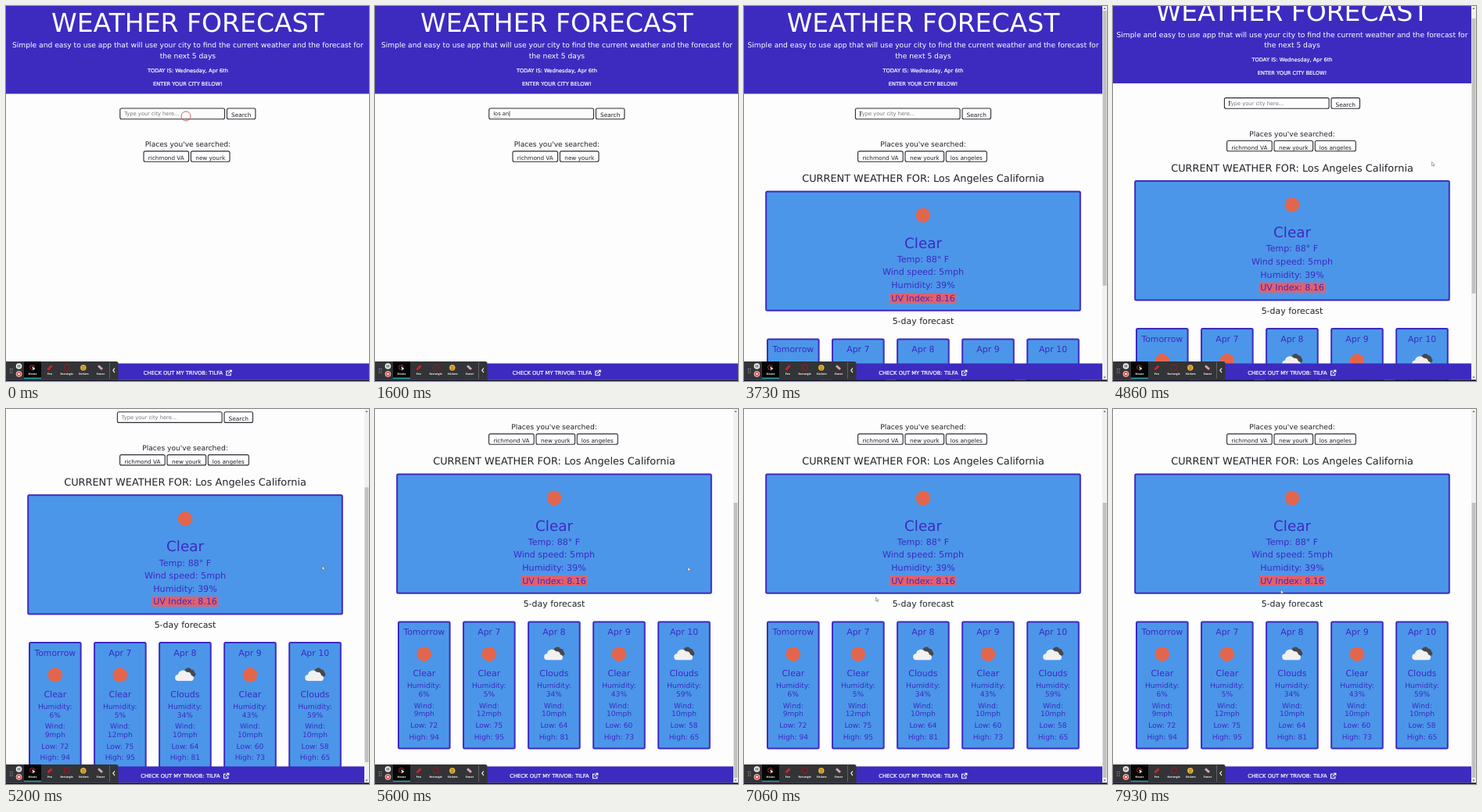
Animation of 464x480 px, one loop 8000 ms. Source, as an HTML page:

```html
<!DOCTYPE html>
<html lang="en">
<head>
<meta charset="utf-8">
<title>Weather forecast</title>
<style>
  html, body { margin: 0; width: 100%; height: 100%; overflow: hidden; background: #fdfdfd; }
  svg { display: block; width: 100vw; height: 100vh; }
  text { font-family: "DejaVu Sans", Verdana, sans-serif; text-rendering: geometricPrecision; white-space: pre; }
  .mid { text-anchor: middle; }
  .brand { fill: #3d2bc0; }
  .dark { fill: #212329; }
  .light { fill: #fff; }
  .strong { stroke: #fff; stroke-width: .2; }
  .hint { fill: #74777c; }
  .box { fill: #fdfdfd; stroke: #2b2d33; stroke-width: 1.1; }
  .card { fill: #4c96e9; stroke: #3d2bc0; stroke-width: 2; }
  .sun { fill: #e2664d; }
  .tool { font: 700 3.3px "Open Sans", sans-serif; fill: #fff; }
</style>
</head>
<body>
<svg viewBox="0 0 464 480" preserveAspectRatio="none">
  <defs>
    <g id="sun"><circle class="sun" r="9.3"/></g>
    <g id="cloud">
      <path fill="#48484a" d="M0 -3a4.5 4.5 0 0 1 8 -4a4 4 0 0 1 4 3.500a3.300 3.300 0 0 1 0 5.500h-9z"/>
      <path fill="#f1f1f1" d="M-8.500 7.500a4 4 0 0 1 -.5 -8a6.500 6.500 0 0 1 11.500 -3a5 5 0 0 1 5.500 4a3.700 3.700 0 0 1 1 7z"/>
    </g>
  </defs>
  <rect width="464" height="480" fill="#fdfdfd"/>
  <g id="page">
    <rect class="brand" x="-10" y="-2" width="490" height="114.400"/>
    <g id="search">
      <rect class="box" x="142.400" y="131" width="133.700" height="13.700" rx="2"/>
      <text id="entry" x="147.800" y="140.400" font-size="6.700"></text>
      <path id="squiggle" d="M148 142.300h9.300" stroke="#d33" stroke-width=".7" stroke-dasharray="1 .6"/>
      <rect id="caret" y="134.500" width=".7" height="7" fill="#111"/>
    </g>
    <g id="history"></g>
    <g id="results"></g>
  </g>
  <rect class="brand" y="457.500" width="464" height="21"/>
  <g id="footer">
    <text class="light strong" x="172.300" y="472" font-size="6.750">CHECK OUT MY TRIVOB: TILFA</text>
    <path d="M281.500 467.300h-3v5.400h5.300v-2.700M280.700 470.400l4-4M282 466.300h2.800v2.800" fill="none" stroke="#fff" stroke-width="1.100"/>
  </g>
  <g id="scrollbar">
    <rect x="458" width="6" height="478.500" fill="#f1f1f1"/>
    <path d="M459.500 4l1.500-2 1.500 2zM459.500 474.500l1.500 2 1.500-2z" fill="#606060"/>
    <rect id="thumb" x="458.600" y="6" width="4.800" height="352" fill="#c1c1c1"/>
  </g>
  <rect y="478.500" width="464" height="1.500" fill="#0b0a24"/>
  <g id="tools">
    <path d="M0 455h141a2.500 2.500 0 0 1 2.500 2.500v21H0z" fill="#333437"/>
    <rect x="23" y="455" width="22" height="22" fill="#050505"/>
    <rect x="23" y="475.700" width="22" height="1.300" fill="#22b8b0"/>
    <path d="M5.500 464v6M8 464v6" stroke="#aaa" stroke-width="1.100" stroke-dasharray="1.100 1.400"/>
    <circle cx="16.500" cy="461" r="3.800" fill="#eee"/>
    <path d="M15.400 459.300v3.400M17.600 459.300v3.400" stroke="#333" stroke-width="1"/>
    <circle cx="16.500" cy="471" r="3.500" fill="#e8443c" stroke="#eee" stroke-width=".8"/>
    <rect x="15.300" y="469.800" width="2.400" height="2.400" fill="#fff"/>
    <circle cx="33.500" cy="462.500" r="3" fill="none" stroke="#d6343f" stroke-width=".8"/>
    <path d="M33.500 461l4 3.700-2 .2-1 1.800z" fill="#fff"/>
    <path d="M53.500 465.500l5-5" stroke="#d6202c" stroke-width="2.600"/>
    <rect x="74.500" y="459.500" width="6.500" height="6.500" rx="1" fill="none" stroke="#a31621" stroke-width="1"/>
    <circle cx="98.800" cy="463" r="3.700" fill="#efb83c"/>
    <path d="M96.800 462h4M97 464.200q1.800 1.600 3.600 0" fill="none" stroke="#60420e" stroke-width=".8"/>
    <path d="M118 460.500l5 4.500" stroke="#d9a6b0" stroke-width="3"/>
    <path d="M132.500 456v21" stroke="#77787a" stroke-width=".7"/>
    <path d="M139 463.500l-2.200 2.800 2.200 2.800" fill="none" stroke="#fff" stroke-width="1.100"/>
  </g>
  <circle id="ring" cx="230" cy="141" r="6" fill="none" stroke="#c8505c" stroke-width=".9"/>
  <path id="cursor" d="M0 0v5l1.200-1 .9 1.800 .9-.4-.9-1.700h1.600z" fill="#fff" stroke="#555" stroke-width=".5"/>
</svg>
<script>
const LOOP = 8000, CENTER = 229, SUBMIT = 3130, LOADED = 3460;
const $ = id => document.getElementById(id);

function add(parent, tag, attrs, content = '') {
  const el = document.createElementNS('http://www.w3.org/2000/svg', tag);
  for (const name in attrs) el.setAttribute(name, attrs[name]);
  el.textContent = content;
  return parent.appendChild(el);
}
const label = (parent, content, y, size, color = 'dark', x = CENTER) =>
  add(parent, 'text', { x, y, 'font-size': size, class: 'mid ' + color }, content);
const icon = (parent, name, x, y) =>
  add(parent, 'use', { href: '#' + name, transform: `translate(${x} ${y})` });

function button(parent, content, x, y, width, height, size = 7.25) {
  const group = add(parent, 'g', {});
  add(group, 'rect', { class: 'box', x, y, width, height, rx: 2 });
  label(group, content, y + 11.4, size, 'dark', x + width / 2);
  return group;
}

// Header and search row
const page = $('page');
label(page, 'WEATHER FORECAST', 32.8, 33.05, 'light');
label(page, 'Simple and easy to use app that will use your city to find the current weather and the forecast for', 53, 9.16, 'light');
label(page, 'the next 5 days', 66.8, 9.16, 'light');
label(page, 'TODAY IS: Wednesday, Apr 6th', 84.6, 6.7, 'light strong');
label(page, 'ENTER YOUR CITY BELOW!', 101.6, 6.68, 'light strong');
label(page, "Places you've searched:", 180, 9.1);
button($('search'), 'Search', 279, 131, 36.5, 13.7, 7.4);

const history = $('history');
button(history, 'richmond VA', 145.6, 185.9, 57.6, 13.3);
button(history, 'new yourk', 206, 185.9, 49.6, 13.3);
const newPlace = button(history, 'los angeles', 258.3, 185.9, 52, 13.3);

// Current weather
const results = $('results');
label(results, 'CURRENT WEATHER FOR: Los Angeles California', 225, 12.86);
add(results, 'rect', { class: 'card', x: 28.2, y: 237.5, width: 401.6, height: 152.3, rx: 1.5 });
icon(results, 'sun', CENTER, 267.8);
label(results, 'Clear', 309.7, 18.3, 'brand');
add(results, 'rect', { x: 186.7, y: 367.4, width: 84.6, height: 12.8, fill: '#e2606c' });
['Temp: 88° F', 'Wind speed: 5mph', 'Humidity: 39%', 'UV Index: 8.16']
  .forEach((line, i) => label(results, line, 327.8 + i * 16.6, 11.1, 'brand'));
label(results, '5-day forecast', 407, 10.95);

// Five-day forecast: day, sky, humidity, wind, low, high
[
  ['Tomorrow', 'Clear', 6, 9, 72, 94],
  ['Apr 7', 'Clear', 5, 12, 75, 95],
  ['Apr 8', 'Clouds', 34, 10, 64, 81],
  ['Apr 9', 'Clear', 43, 10, 60, 73],
  ['Apr 10', 'Clouds', 59, 10, 58, 65],
].forEach(([day, sky, humidity, wind, low, high], i) => {
  const x = 62.8 + i * 83.05;
  add(results, 'rect', { class: 'card', x: x - 32.8, y: 426.4, width: 65.6, height: 162, rx: 1.5 });
  label(results, day, 443.4, 10.9, 'brand', x);
  icon(results, sky === 'Clear' ? 'sun' : 'cloud', x, 467.7);
  label(results, sky, 496.4, 11, 'brand', x);
  [
    ['Humidity:', 511.2], [humidity + '%', 522], ['Wind:', 536.6], [wind + 'mph', 547.4],
    ['Low: ' + low, 562], ['High: ' + high, 576.6],
  ].forEach(([line, y]) => label(results, line, y, 9.1, 'brand', x));
});

['Mouse', 'Pen', 'Rectangle', 'Stickers', 'Eraser'].forEach((name, i) =>
  add($('tools'), 'text', { class: 'mid tool', x: 34 + i * 21.75, y: 472 }, name));

// Motion: each key is [time, value]
const KEYSTROKES = [800, 1060, 1200, 1330, 1460, 1600, 2000, 2060, 2130, 2200, 2260];
const SCROLL = [[4790, 0], [4860, 13], [5000, 72], [5130, 112], [5260, 140], [5400, 154],
  [6500, 154], [6610, 118], [6700, 118], [6840, 154]];
const CURSOR_X = [[4400, 430], [4700, 408], [5000, 407], [5500, 400], [6000, 400], [6600, 158.5], [6900, 158.5], [7800, 214.5]];
const CURSOR_Y = [[4400, 215], [4700, 199], [5000, 200], [5500, 202.5], [6000, 202.5], [6600, 243], [6900, 243], [7800, 231.5]];

function at(keys, t) {
  const next = keys.findIndex(key => key[0] > t);
  if (next === 0) return keys[0][1];
  if (next < 0) return keys[keys.length - 1][1];
  const [t0, a] = keys[next - 1], [t1, b] = keys[next];
  return a + (b - a) * (t - t0) / (t1 - t0);
}
const show = (el, on) => el.setAttribute('visibility', on ? 'inherit' : 'hidden');
const move = (el, x, y) => el.setAttribute('transform', `translate(${x} ${y})`);

function draw(t) {
  const submitted = t >= SUBMIT, loaded = t >= LOADED;
  const typed = submitted ? '' : 'los angeles'.slice(0, KEYSTROKES.filter(k => k <= t).length);
  const entry = $('entry');
  entry.textContent = typed || 'Type your city here...';
  entry.setAttribute('class', typed ? 'dark' : 'hint');
  $('caret').setAttribute('x', 148 + (typed ? entry.getComputedTextLength() + .3 : 0));
  show($('caret'), submitted ? (t + 300) % 1000 < 500 : t > 300);
  show($('squiggle'), typed.length > 3);

  const scroll = at(SCROLL, t), shift = loaded ? 0 : 3.4;
  move(page, shift, -scroll);
  move($('footer'), shift, 0);
  move(history, submitted ? 0 : 27, 0);
  $('thumb').setAttribute('y', 6 + scroll * 114 / 154);
  show(newPlace, submitted);
  show(results, loaded);
  show($('scrollbar'), loaded);

  show($('ring'), t < 400);
  $('ring').setAttribute('opacity', at([[100, 1], [400, 0]], t));
  show($('cursor'), t >= 4400);
  move($('cursor'), at(CURSOR_X, t), at(CURSOR_Y, t));
}

const start = performance.now();
function tick() {
  draw((performance.now() - start) % LOOP);
  requestAnimationFrame(tick);
}
tick();
</script>
</body>
</html>
```
